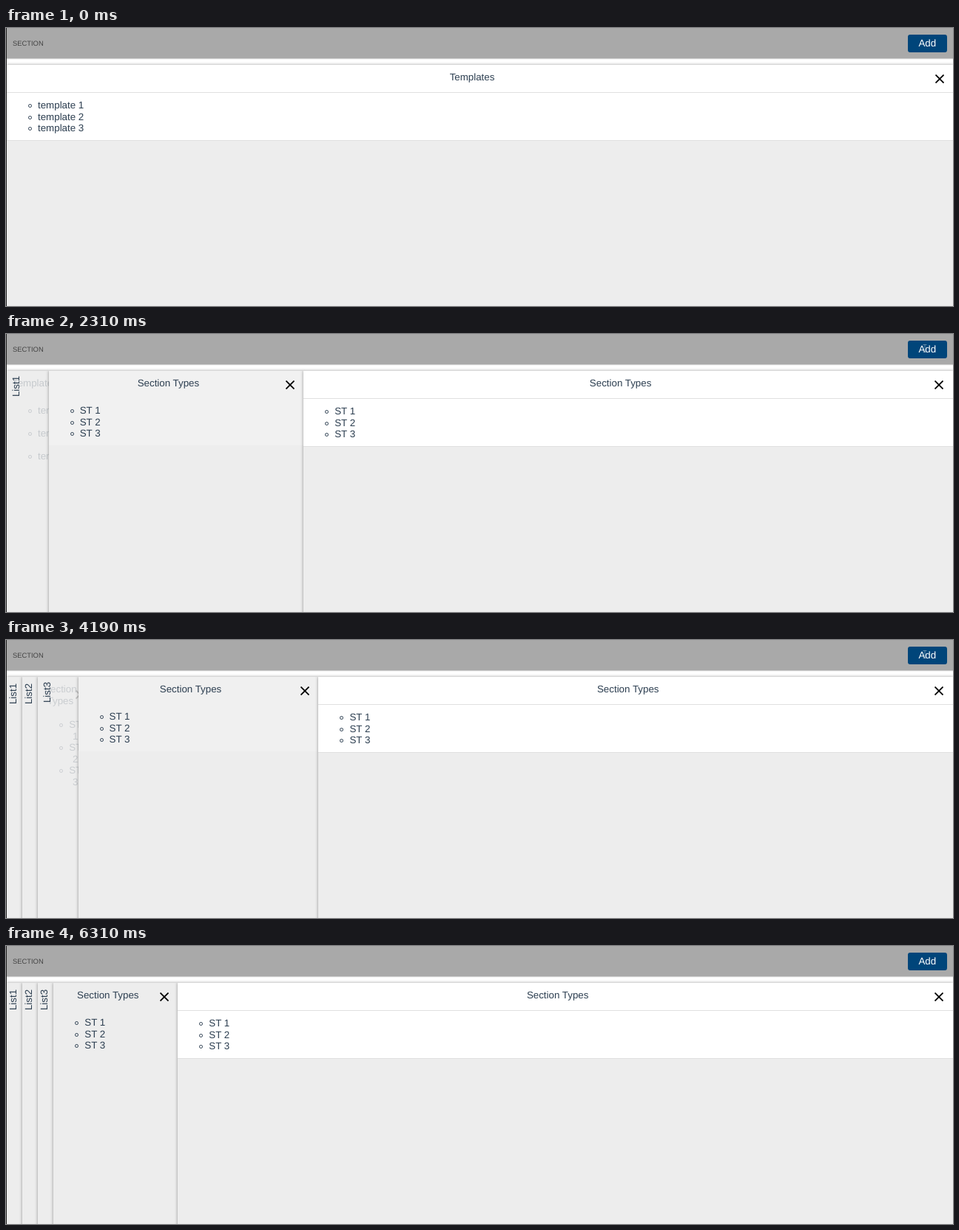
An HTML page for the animation above (6720 ms loop, 1280 px wide and 377 px high).

```html
<!DOCTYPE html>
<html lang="en">
<head>
<meta charset="utf-8">
<title>Sliding panels</title>
<style>
  html, body { margin: 0; width: 100%; height: 100%; overflow: hidden; }
  body {
    position: relative; background: #fff; color: #2c3e50;
    font: 13.333px/15.5px "Liberation Sans", Arial, sans-serif;
    text-rendering: geometricPrecision;
  }
  #bar {
    position: absolute; left: 0; top: 0; width: 1280px; height: 41px;
    background: #a9a9a9; box-shadow: 0 1px 1px rgba(0, 0, 0, .2);
  }
  #bar span { position: absolute; left: 9px; top: 12.5px; font-size: 9.4px; color: #444; }
  #add {
    position: absolute; left: 1218.5px; top: 9px; width: 53.5px; height: 23.5px;
    border-radius: 3px; background: #00457a; color: #fff;
    text-align: center; line-height: 23px;
  }
  #edge { position: absolute; left: 0; top: 0; width: 1px; height: 377px; background: #222; }
  #panels { position: absolute; left: 1px; top: 42px; width: 1279px; height: 335px; overflow: hidden; }
  .panel {
    position: absolute; top: 8px; height: 340px; background: #ededed;
    box-shadow: 0 0 4px rgba(0, 0, 0, .4);
  }
  .clip { position: absolute; inset: 0; overflow: hidden; }
  .head { display: flex; padding: 8px; }
  .title { flex: 1; padding-top: 1px; text-align: center; }
  .close {
    flex: 0 1 21px; min-width: 9px; min-height: 21px;
    display: flex; align-items: center; justify-content: center;
  }
  .close svg { flex: none; }
  ul { list-style: none; margin: 0; padding: 9px 0 8.5px 42px; }
  li { position: relative; width: fit-content; text-align: center; }
  li::before {
    content: ""; position: absolute; left: -13px; top: 6px; width: 3px; height: 3px;
    border: 1px solid #2c3e50; border-radius: 50%;
  }
  .active .head, .active ul { border-bottom: 1px solid #e0e0e0; }
  .label { position: absolute; white-space: nowrap; transform: translate(-50%, -50%) rotate(-90deg); }
  #pointer { position: absolute; left: 0; top: 0; width: 1280px; height: 377px; }
</style>
</head>
<body>
<div id="panels"></div>
<div id="bar"><span>SECTION</span><div id="add">Add</div></div>
<div id="edge"></div>
<svg id="pointer" viewBox="0 0 1280 377">
  <circle id="click" cx="1241" cy="19" r="10" fill="#b9c81e" fill-opacity=".75"/>
  <path id="beam" d="M-2.5 -5.5H2.5M0 -5.5V4.5M-2.5 4.5H2.5" fill="none" stroke="#9fb4c4" stroke-width=".6"/>
  <path id="arrow" d="M.5 .5V11.5L3 9.2L4.8 13.2L6.6 12.4L4.9 8.5H8Z" fill="#fff" stroke="#333" stroke-width=".9"/>
</svg>
<script>
const LOOP = 6720, STEP = LOOP / 88;
const WIDTH = 1279, BIG = 168, SMALL = 21.1, SLIDE = 300, CLICK = 100;
const adds = [1270, 2140, 2825, 4045];

// Pointer strokes; it rests between them
const strokes = [
  { start: 160, end: 840, from: [1258, 245], to: [1242, 20] },
  { start: 4600, end: 5060, from: [1242, 20], to: [1184, 392] },
  { start: 5230, end: 5620, from: [1179, 377], to: [1260, 275], arch: 115 },
  { start: 5990, end: 6310, from: [1260, 275], to: [1272, 380] }
];

const $ = id => document.getElementById(id);
const mix = (a, b, k) => a + (b - a) * k;
const easeOut = k => 1 - (1 - k) ** 2;

// The CSS "ease" curve
function ease(x) {
  if (x <= 0) return 0;
  if (x >= 1) return 1;
  const bez = (a, b, s) => 3 * a * s * (1 - s) ** 2 + 3 * b * s * s * (1 - s) + s ** 3;
  let lo = 0, hi = 1;
  for (let i = 0; i < 24; i++) {
    const mid = (lo + hi) / 2;
    if (bez(.25, .25, mid) < x) lo = mid; else hi = mid;
  }
  return bez(.1, 1, lo);
}

function makePanel(i) {
  const el = document.createElement("div");
  const item = i ? "ST" : "template";
  el.className = "panel";
  el.innerHTML = `<div class="clip"><div class="content">
    <div class="head"><div class="title">${i ? "Section Types" : "Templates"}</div>
    <div class="close"><svg width="12" height="12"><path d="M.5 .5L11.5 11.5M11.5 .5L.5 11.5" stroke="#000" stroke-width="1.8"/></svg></div></div>
    <ul>${[1, 2, 3].map(n => `<li>${item} ${n}</li>`).join("")}</ul></div>
    <div class="label">List${i + 1}</div></div>`;
  $("panels").append(el);
  const find = s => el.querySelector(s);
  return { el, content: find(".content"), head: find(".head"), list: find("ul"), label: find(".label") };
}
const panels = Array.from({ length: adds.length + 1 }, (_, i) => makePanel(i));

// Resting left side of panel i after k additions
function restLeft(i, k) {
  if (i < k || i === 0) return SMALL * i;
  return i === k ? BIG + SMALL * (k - 1) : WIDTH;
}

function drawPanels(t) {
  const k = adds.filter(a => t > a).length;
  const p = k ? ease((t - adds[k - 1]) / SLIDE) : 1;
  const left = i => {
    if (i > k) return WIDTH;
    return k ? mix(restLeft(i, k - 1), restLeft(i, k), i < k ? p ** 1.28 : p) : 0;
  };
  panels.forEach(({ el, content, head, list, label }, i) => {
    el.style.display = i > k ? "none" : "";
    if (i > k) return;
    const x = left(i), w = left(i + 1) - x;
    el.style.left = x + "px";
    el.style.width = w + "px";
    el.classList.toggle("active", i === k);
    const white = i === k ? 1 : i === k - 1 ? 1 - p : 0;
    head.style.background = list.style.background = `rgba(255,255,255,${white})`;
    const folded = i < k - 2 ? 1 : i === k - 2 ? p : 0;
    content.style.opacity = 1 - folded;
    label.style.opacity = Math.min(1, folded * 1.25);
    label.style.left = 8.8 + (w - SMALL) * .12 + "px";
    label.style.top = 23 - (1 - folded) * 10 + "px";
  });
}

function drawPointer(t) {
  const s = strokes.filter(s => t >= s.start - STEP / 2).pop();
  let x = 0, y = 400;
  if (s) {
    const k = Math.min(1, Math.max(0, (t - s.start) / (s.end - s.start)));
    x = mix(s.from[0], s.to[0], easeOut(k));
    y = mix(s.from[1], s.to[1], easeOut(k)) - (s.arch || 0) * Math.sin(Math.PI * k);
  }
  const over = y < 31;
  const show = (id, on) => $(id).style.display = on ? "" : "none";
  show("beam", over);
  show("arrow", !over && y < 377);
  show("click", adds.some(a => t >= a - CLICK && t < a));
  for (const id of ["beam", "arrow"]) $(id).setAttribute("transform", `translate(${x} ${y})`);
}

const start = performance.now();
function tick() {
  const now = (performance.now() - start) % LOOP;
  const t = Math.floor(now / STEP + .15) * STEP;
  drawPanels(t);
  drawPointer(t);
  requestAnimationFrame(tick);
}
tick();
</script>
</body>
</html>
```
